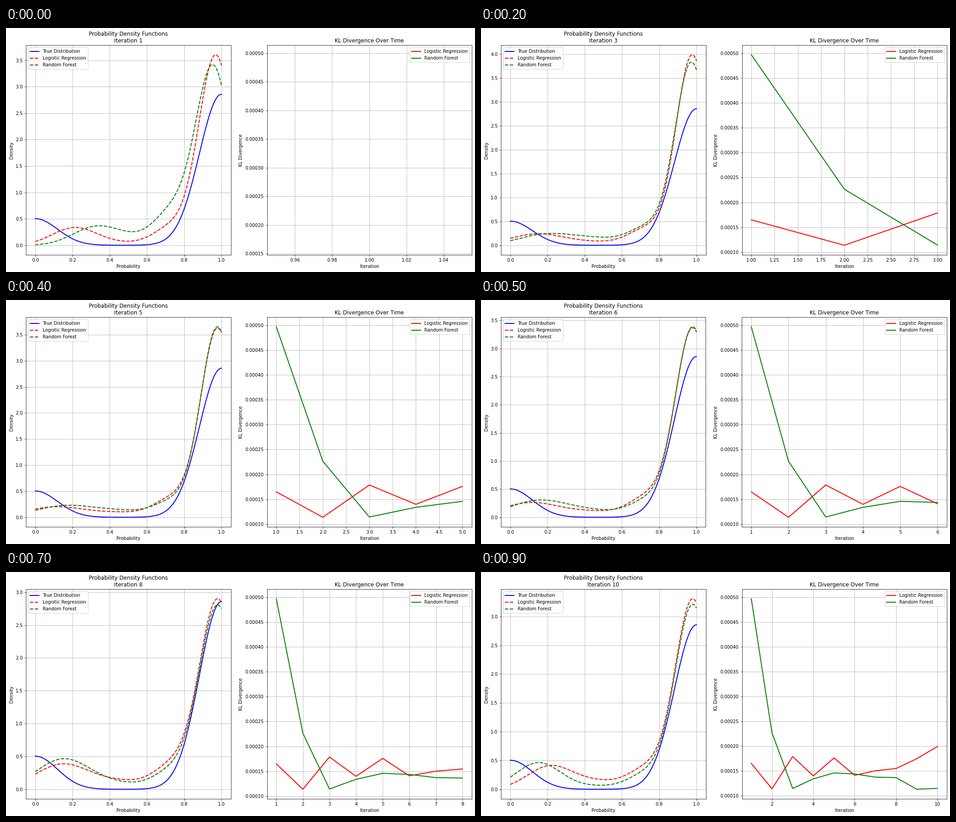
Animation of 1036x541 px, one loop 1 s. Source, as a matplotlib script:

```python
import numpy as np
import matplotlib.pyplot as plt
from matplotlib.animation import FuncAnimation

W, H, DPI = 1036, 541, 72
STEPS = 10
MODELS = [("Logistic Regression", "red"), ("Random Forest", "green")]

plt.rcParams["font.family"] = "DejaVu Sans"

# Heights of the main peak and of the left lump at a few iterations
KEYS = [1, 4, 5, 8, 10]
PEAKS = [[3.58, 4.16, 3.61, 2.88, 3.29], [3.355, 4.04, 3.635, 2.79, 3.20]]
LUMPS = [[.33, .19, .20, .38, .39], [.28, .20, .22, .46, .46]]

# KL divergence per iteration, in units of 1e-4
KL = [[1.648, 1.137, 1.786, 1.397, 1.758, 1.408, 1.50, 1.545, 1.743, 1.99],
      [4.97, 2.264, 1.142, 1.337, 1.457, 1.435, 1.371, 1.362, 1.127, 1.145]]

x = np.linspace(0, 1, 400)


def bell(height, mean, sigma):
    return height * np.exp(-.5 * ((x - mean) / sigma) ** 2)


def density(model, step):
    """Sum of a main peak, a shoulder, a middle rise and a left lump."""
    t = (step - 1) / (STEPS - 1)
    arc = np.sin(np.pi * t)
    settle = np.exp(-(step - 1) / 1.5)
    peak = np.interp(step, KEYS, PEAKS[model])
    lump = np.interp(step, KEYS, LUMPS[model])
    if model == 0:
        centre, shoulder = .981 - .011 * settle, .35
        middle, lump_at = .04 + .09 * t, .21 - .1 * arc
    else:
        centre, shoulder = .981 - .025 * settle, .27 + .35 * settle
        middle, lump_at = .15 - .1 * t, .15 + .16 * settle
    return (bell(peak, centre, .1325 - .0114 * peak)  # taller is narrower
            + bell(shoulder, .74, .1)
            + bell(middle, .47, .14)
            + bell(lump, lump_at, .12 + .04 * arc))


def decorate(ax, title, xlabel, ylabel, loc):
    ax.set_title(title)
    ax.set_xlabel(xlabel)
    ax.set_ylabel(ylabel)
    ax.legend(loc=loc)
    ax.grid(True)


true_pdf = bell(.504, 0, .1187) + bell(2.857, 1, .1187)

fig, (ax_pdf, ax_kl) = plt.subplots(1, 2, figsize=(W / DPI, H / DPI), dpi=DPI)


def draw(frame):
    step = frame + 1
    steps = np.arange(1, step + 1)
    ax_pdf.clear()
    ax_kl.clear()

    ax_pdf.plot(x, true_pdf, color="blue", lw=2, label="True Distribution")
    for i, (name, color) in enumerate(MODELS):
        ax_pdf.plot(x, density(i, step), "--", color=color, lw=2, label=name)
        ax_kl.plot(steps, 1e-4 * np.array(KL[i][:step]), color=color, lw=2, label=name)

    decorate(ax_pdf, f"Probability Density Functions\nIteration {step}",
             "Probability", "Density", "upper left")
    decorate(ax_kl, "KL Divergence Over Time",
             "Iteration", "KL Divergence", "upper right")

    # Panels widen when the tick labels get narrower.
    fig.tight_layout(pad=.72, w_pad=1.8)
    return []


anim = FuncAnimation(fig, draw, frames=STEPS, interval=100, repeat=True, repeat_delay=0)

plt.show()
```
